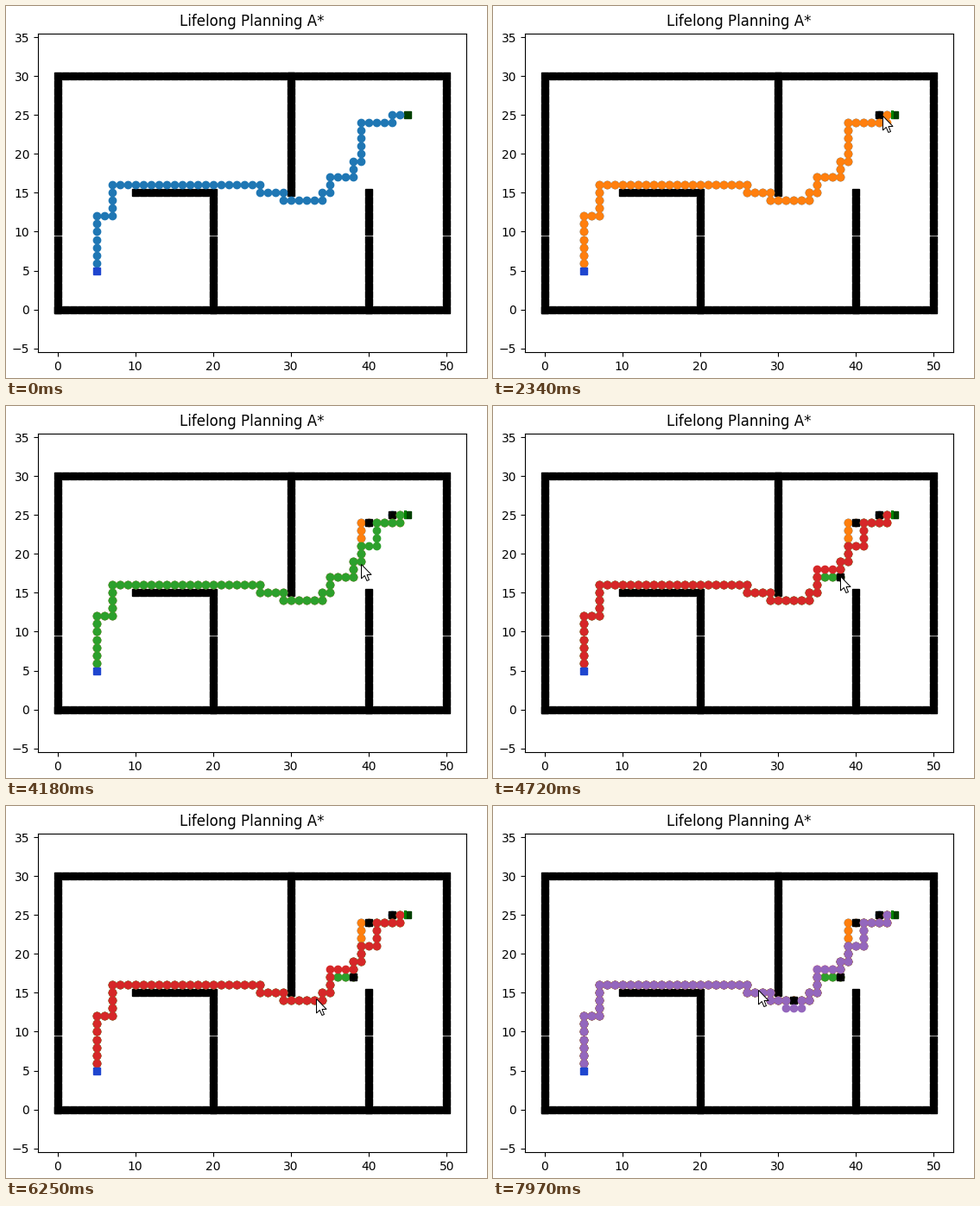
These frames come from a looping animation (557 by 431 pixels, 8 s). A matplotlib script:

```python
import numpy as np
import matplotlib.pyplot as plt
from matplotlib.animation import FuncAnimation
from matplotlib.patches import Polygon, Rectangle

W, H, DPI = 557, 431, 100
LOOP, STEP = 8000, 40
AX_W, AX_H = 496, 369.6

plt.rcParams["font.family"] = "DejaVu Sans"
# The small excess keeps the pixel size from rounding down
fig = plt.figure(figsize=((W + 0.01) / DPI, (H + 0.01) / DPI), dpi=DPI)
ax = fig.add_axes([37 / W, 29.8 / H, AX_W / W, AX_H / H])
half_height = AX_H / AX_W * 55 / 2
ax.set(xlim=(-2.5, 52.5), ylim=(15 - half_height, 15 + half_height),
       xticks=range(0, 51, 10), yticks=range(-5, 36, 5))
ax.set_title("Lifelong Planning A*")


def walk(*corners):
    """All grid cells along a polyline of axis-aligned segments."""
    cells = [corners[0]]
    for x, y in corners[1:]:
        while cells[-1] != (x, y):
            cx, cy = cells[-1]
            cells.append((cx + int(np.sign(x - cx)), cy + int(np.sign(y - cy))))
    return cells


def plot_cells(cells, marker, color):
    xs, ys = zip(*cells)
    return ax.plot(xs, ys, marker, color=color)[0]


walls = [
    walk((0, 0), (50, 0), (50, 30), (0, 30), (0, 0)),
    walk((20, 0), (20, 15), (10, 15)),
    walk((30, 30), (30, 15)),
    walk((40, 0), (40, 15)),
]
plot_cells(sum(walls, []), "s", "k")
plot_cells([(45, 25)], "s", "#004000")

# Route pieces shared by the successive plans
start = [(5, 6), (5, 12), (7, 12), (7, 16), (26, 16), (26, 15), (29, 15), (29, 14)]
gap = [(34, 14)]
gap_detour = [(31, 14), (31, 13), (33, 13), (33, 14), (34, 14)]
climb = [(34, 15), (35, 15), (35, 17), (38, 17), (38, 19), (39, 19)]
climb_detour = [(34, 15), (35, 15), (35, 18), (38, 18), (38, 19), (39, 19)]
end_high = [(39, 24), (43, 24), (43, 25), (44, 25)]
end_low = [(39, 24), (44, 24), (44, 25)]
end_detour = [(39, 21), (41, 21), (41, 24), (44, 24), (44, 25)]

# Time shown, new obstacle, route
plans = [
    (0, None, start + gap + climb + end_high),
    (2200, (43, 25), start + gap + climb + end_low),
    (3240, (40, 24), start + gap + climb + end_detour),
    (4720, (38, 17), start + gap + climb_detour + end_detour),
    (6720, (32, 14), start + gap_detour + climb_detour + end_detour),
]
layers = []
for i, (time, block, route) in enumerate(plans):
    if block:
        layers.append((time, plot_cells([block], "s", "k")))
    layers.append((time, plot_cells(walk(*route), "o", f"C{i}")))
plot_cells([(5, 5)], "s", "#1f46cf")

# Overlay in stage pixels, y down
stage = fig.add_axes([0, 0, 1, 1])
stage.set(xlim=(0, W), ylim=(H, 0))
stage.axis("off")
goal_edge = stage.add_patch(Rectangle((461, 121), 3, 10, color="g", lw=0))
layers.append((plans[1][0], goal_edge))

ARROW = np.array([(0, 0), (0, 16.5), (3.8, 13), (6.4, 19), (9, 18),
                  (6.5, 12), (11.6, 12)]) + 0.5
cursor = stage.add_patch(Polygon(ARROW, closed=True, fc="w", ec="k", lw=0.72,
                                 joinstyle="miter", zorder=5))

# Pointer tip: time, x, y
TIP = np.array([
    (90, 575, 132), (240, 515, 122), (420, 440, 108), (540, 419, 112),
    (700, 432, 125), (890, 451, 123), (1450, 451, 123), (1490, 448, 122),
    (1870, 450, 123), (2040, 450, 123), (2120, 451, 127), (2360, 451, 127),
    (2540, 440, 110), (2850, 425, 134), (2900, 424, 134), (2950, 423, 133),
    (3180, 423, 133), (3380, 425, 130), (3600, 428, 148), (3960, 412, 179),
    (3990, 411, 182), (4150, 411, 182), (4180, 411, 184), (4310, 404, 188),
    (4540, 404, 188), (4640, 402, 197), (4780, 402, 197), (5050, 373, 223),
    (5190, 373, 223), (5280, 357, 223), (5480, 357, 223), (5510, 363, 224),
    (5800, 376, 209), (6020, 370, 220), (6250, 358, 223), (6340, 358, 223),
    (6480, 348, 225), (6740, 348, 225), (6910, 360, 222), (7000, 362, 222),
    (7240, 362, 222), (7390, 380, 229), (7600, 335, 218), (7800, 291, 205),
    (7960, 307, 213), (8000, 307, 213),
])


def update(frame):
    t = frame * STEP
    for time, artist in layers:
        artist.set_visible(t >= time)
    tip = [round(np.interp(t, TIP[:, 0], TIP[:, k])) for k in (1, 2)]
    cursor.set_xy(ARROW + tip)
    return [artist for _, artist in layers] + [cursor]


anim = FuncAnimation(fig, update, frames=LOOP // STEP, interval=STEP,
                     repeat=True, repeat_delay=0)
plt.show()
```
